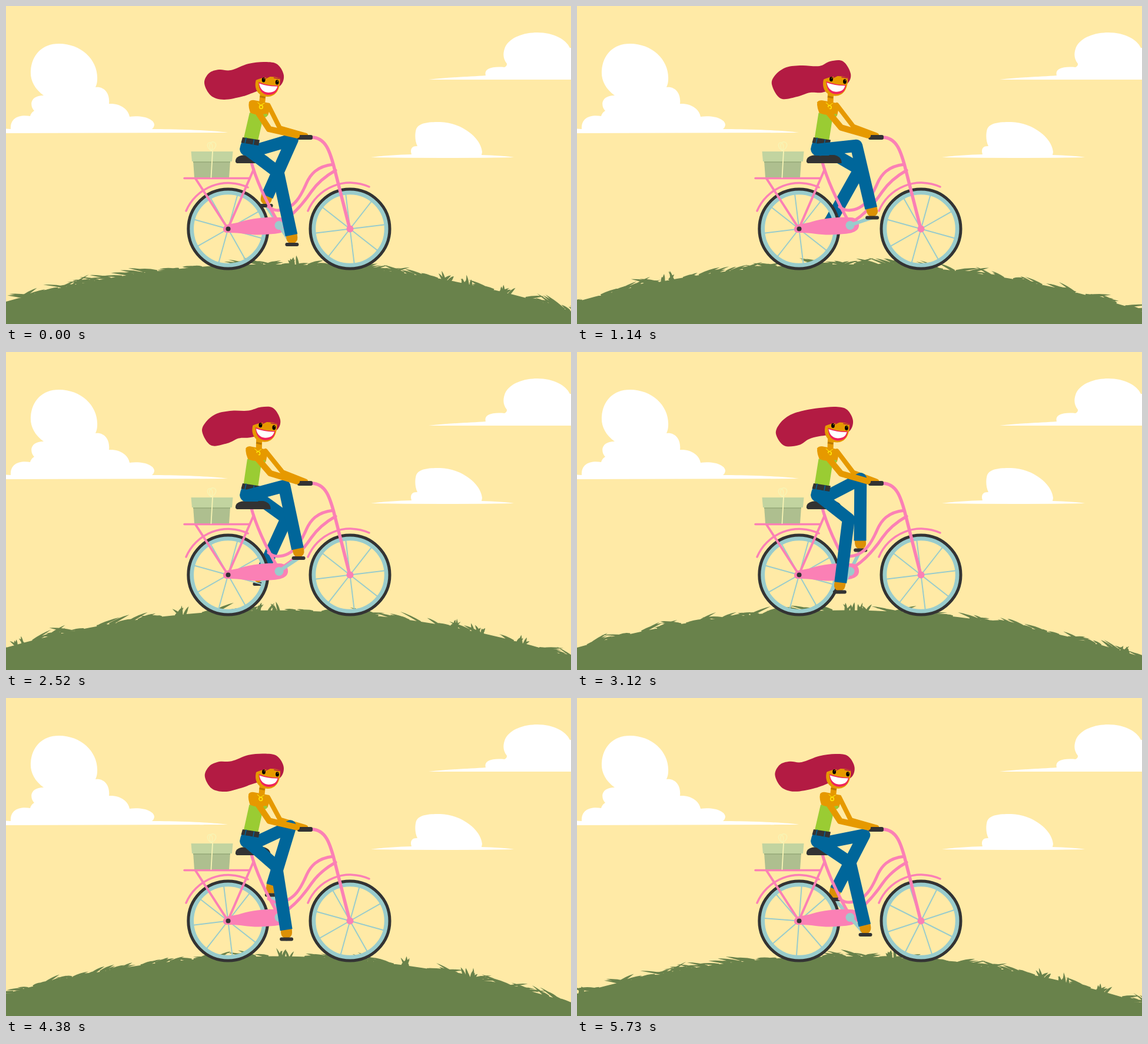
These frames come from a looping animation (960x540 px, 5760 ms). An HTML page:

```html
<!DOCTYPE html>
<html lang="en">
<head>
<meta charset="utf-8">
<title>Bicycle ride</title>
<style>
  html, body { margin: 0; width: 100%; height: 100%; overflow: hidden; background: #ffeaa6; }
  svg { display: block; width: 100%; height: 100%; }
  .line { fill: none; stroke-linecap: round; stroke-linejoin: round; }
  .pink { stroke: #fb80b5; }
  .steel { stroke: #99cccc; }
  .skin { stroke: #e69900; }
  .denim { stroke: #00669a; stroke-linecap: butt; }
</style>
</head>
<body>
<svg viewBox="0 0 960 540">
  <rect width="960" height="540" fill="#ffeaa6"/>
  <g fill="#fff">
    <path d="M-5 208L8 209C7 190 22 184 41 187C43 180 48 178 48 178C40 170 40 152 64 152C48 140 41 126 42 110C44 82 62 64 90 64C128 64 157 92 155 125C155 131 153 136 152 138C168 136 177 150 175 166C195 165 208 176 210 188C235 185 252 193 252 202Q251 207 248 209C290 209 350 211 377 215L-5 216Z"/>
    <path d="M718 125C750 121 790 120 815 118C812 108 822 102 847 104C851 102 851 100 851 98C843 88 845 78 848 70C856 53 880 45 903 45C930 45 952 57 958 71L965 72V125Z"/>
    <path d="M620 257Q650 253 689 252C686 243 690 237 699 238C694 228 695 215 697 209C701 199 716 196.500 738 197C773 198 807 223 809 248L808 253Q845 254 863 257Q740 259 620 257Z"/>
  </g>
  <path id="hill" fill="#69824b"/>

  <path id="farArm" class="line skin" stroke-width="8"/>
  <g id="farLeg"></g>

  <g id="rearWheel"></g>
  <g id="frontWheel"></g>
  <g class="line pink">
    <path stroke-width="3.500" d="M303 292.500H414"/>
    <path stroke-width="4" d="M322 293L377 378L421 277"/>
    <path stroke-width="3.500" d="M306 348A78 78 0 0 1 411 308M513 348A78 78 0 0 1 617 307"/>
    <path stroke-width="5" d="M416 262Q428 308 464 370M556 269C528 272 517 286 510 302C503 318 491 346 462 347C455 347 450 344 446 341M560 279C541 290 528 302 519 315C508 331 490 353 472 364"/>
    <path stroke-width="5.500" d="M519 223C544 223 551 250 557 272L584 378"/>
  </g>
  <path fill="#fb80b5" d="M369 379C369 368 388 371 400 366C420 360 445 358 462 359C475 358 480 366 479 374C477 386 460 387 440 388C415 390 395 384 378 385C371 385 369 383 369 379Z"/>
  <circle cx="377.500" cy="378.500" r="4" fill="#333"/>
  <circle cx="584.500" cy="378.500" r="6" fill="#fb80b5"/>

  <path fill="#aebf8f" d="M318 263H381L379 291H320Z"/>
  <path fill="#9db07f" d="M318 263H381V266H318Z"/>
  <path fill="#c2d4a0" d="M314.500 247H385.500L384 264H316Z"/>
  <g class="line" stroke="#f8f4b4" stroke-width="1.800">
    <path d="M351 247L348.500 291"/>
    <path stroke-width="1.500" d="M349 246C340 240 341 231 347 232C352 234 351 241 349 246C343 236 347 230 353 231C360 234 356 242 349 246"/>
  </g>

  <path fill="#333" d="M390 265C389 257 396 253 408 253H437C446 255 450 260 449.500 267H392Z"/>
  <rect x="495" y="219" width="26" height="8" rx="3" fill="#333"/>
  <circle cx="464" cy="372.500" r="7.500" fill="#99cccc"/>

  <path fill="#00669a" d="M401 230L431 235L437 244L428 254H406Q398 252 397 243Q398 236 401 230Z"/>
  <g id="torso">
    <path class="line skin" stroke-width="10" d="M437 148L435 166"/>
    <path fill="#b97800" d="M432 152L441 154L440 157L431 155Z"/>
    <path fill="#e69900" d="M413 163Q416 159 422 160L448 165Q451 168 445 186H417Q411 172 413 163Z"/>
    <path fill="#9acc33" d="M414 181Q426 186 435 184L444 183Q447 188 437 190L428 229L404 224Z"/>
    <circle cx="433.500" cy="171.500" r="2.900" fill="none" stroke="#ffe60a" stroke-width="1.600"/>
    <path class="line" stroke="#ffe60a" stroke-width="1" d="M428 164L433 168.500L439 165"/>
  </g>
  <path fill="#333" d="M402 223L431 227.500L429 237L399.500 232Z"/>
  <path class="line" stroke="#00669a" stroke-width="1.500" d="M408 224L406 233M421.500 227L420 235"/>
  <g id="nearLeg"></g>
  <path id="nearArm" class="line skin" stroke-width="10.500"/>

  <path id="hair" fill="#b31b43"/>
  <g id="face">
    <path fill="#e69900" d="M425 126Q432 121 442 120.500Q456 119 466 123C467 142 458 154 445 154C430 154 421 142 425 126Z"/>
    <path fill="#b31b43" d="M424 126Q431 119 450 119.500L439 125L443 121Q434 122 424 126Z"/>
    <path class="line" stroke="#b31b43" stroke-width="1.500" d="M456 122L465 123.500"/>
    <ellipse cx="438" cy="125.500" rx="2.900" ry="4"/>
    <ellipse cx="461" cy="129.500" rx="2.900" ry="4"/>
    <circle cx="438.800" cy="123.700" r=".8" fill="#e69900"/>
    <circle cx="461.800" cy="127.700" r=".8" fill="#e69900"/>
    <path fill="#f0245a" d="M429.500 129Q446 136 463 135Q462 151 446 151Q430 150 429.500 129Z"/>
    <path fill="#fff" d="M430.500 131.500Q446 137 461.500 136.500Q459 147 446 147Q433 146 430.500 131.500Z"/>
  </g>
</svg>
<script>
const LOOP = 5760, STEP = 30, TURN = Math.PI * 2;
const $ = id => document.getElementById(id);
const setD = (id, d) => $(id).setAttribute('d', d);
const mod = (a, n) => ((a % n) + n) % n;
const at = (x, y) => x.toFixed(1) + ' ' + y.toFixed(1);

let seed = 29;
const rand = (lo = 0, hi = 1) => {
  seed = (seed * 16807) % 2147483647;
  return lo + (hi - lo) * seed / 2147483647;
};

// Ground: a large disc whose rim carries clusters of blades
const HILL = { x: 453, top: 438.5, r: 1650 };
const RIM = HILL.r * TURN * 300 / 360;
const blades = [];
for (let s = 0; s < RIM - 40; s += rand(16, 48)) {
  const tuft = rand() < 0.1, side = rand() < 0.5 ? -1 : 1;
  const count = Math.round(tuft ? rand(5, 7) : rand(2, 5));
  for (let i = 0; i < count; i++) {
    blades.push({
      s: s + rand(0, tuft ? 20 : 34),
      lean: tuft ? rand(-0.8, 0.8) : side * rand(1.15, 1.48),
      len: tuft ? rand(9, 18) : rand(16, 40),
      w: rand(1.6, 2.8)
    });
  }
}

function drawHill(t) {
  const edge = x => HILL.top + HILL.r - Math.sqrt(HILL.r ** 2 - (x - HILL.x) ** 2);
  let d = `M-20 560L-20 ${edge(-20)}A${HILL.r} ${HILL.r} 0 0 1 980 ${edge(980)}L980 560Z`;
  const shift = RIM * t / LOOP;
  for (const b of blades) {
    const s = mod(b.s - shift, RIM) - 60;
    if (s > 1020) continue;
    const a = (s - HILL.x) / HILL.r, lean = a + b.lean;
    const x = HILL.x + HILL.r * Math.sin(a);
    const y = HILL.top + HILL.r * (1 - Math.cos(a)) + 1;
    const ux = Math.sin(lean), uy = -Math.cos(lean), nx = -uy * b.w, ny = ux * b.w;
    const mx = x + ux * b.len * 0.5, my = y + uy * b.len * 0.5 - 1;
    const tip = at(x + ux * b.len, y + uy * b.len + 1);
    // both sides keep the same winding as the hill
    d += `M${at(x - nx, y - ny)}Q${at(mx - nx, my - ny)} ${tip}Q${at(mx + nx, my + ny)} ${at(x + nx, y + ny)}Z`;
  }
  setD('hill', d);
}

function buildWheel(id, x) {
  let spokes = '';
  for (let i = 0; i < 8; i++) {
    const a = i * TURN / 8;
    spokes += `M0 0L${at(60 * Math.cos(a), 60 * Math.sin(a))}`;
  }
  $(id).innerHTML = `<g transform="translate(${x} 378.5)" fill="none">
    <path class="steel" stroke-width="2" d="${spokes}"/>
    <circle r="62" class="steel" stroke-width="7.500"/>
    <circle r="67.500" stroke="#333" stroke-width="5"/></g>`;
}
const spin = (id, deg) => $(id).querySelector('path').setAttribute('transform', `rotate(${deg})`);

const CRANK = { x: 464, y: 372, r: 39.7 };
const THIGH = 64;
const NEAR = { id: 'nearLeg', x: 411, y: 244, shin: 109, crankOnTop: false };
const FAR = { id: 'farLeg', x: 425, y: 245, shin: 105, crankOnTop: true };

function drawLeg(leg, angle) {
  const px = CRANK.x + CRANK.r * Math.cos(angle), py = CRANK.y + CRANK.r * Math.sin(angle);
  const ax = px + (470 - px) * 0.06, ay = py - 16;
  const dx = ax - leg.x, dy = ay - leg.y, dist = Math.hypot(dx, dy);
  const bend = Math.acos((THIGH ** 2 + dist ** 2 - leg.shin ** 2) / (2 * THIGH * dist));
  const a = Math.atan2(dy, dx) - bend;
  const knee = at(leg.x + THIGH * Math.cos(a), leg.y + THIGH * Math.sin(a));
  const crank = `<path class="line steel" stroke-width="6" d="M${CRANK.x} ${CRANK.y}L${at(px, py)}"/>`;
  const limb = `
    <path class="line" stroke="#db9006" stroke-width="19" d="M${at(ax, ay - 3)}L${at(px, py - 11)}"/>
    <circle cx="${leg.x}" cy="${leg.y}" r="10" fill="#00669a"/>
    <path class="line denim" stroke-width="21" d="M${at(leg.x, leg.y)}L${knee}L${at(ax, ay)}"/>`;
  const sole = `<path class="line" stroke="#333" stroke-width="6" d="M${at(px - 8.5, py)}h17"/>`;
  $(leg.id).innerHTML = (leg.crankOnTop ? limb + crank : crank + limb) + sole;
}

// Hair outlines through one sway, as x,y pairs
const HAIR_TIMES = [0, 0.333, 0.583, 0.708];
const HAIR = [
  [337,131, 345,114, 362,108, 382,109, 412,98, 440,95, 461,99, 472,118, 465,136, 440,140, 418,148, 400,154, 370,159, 348,152],
  [338,139, 345,121, 362,107, 387,99, 412,95, 440,93, 459,98, 469,117, 462,135, 438,140, 412,143, 394,148, 377,158, 352,159],
  [331,133, 338,116, 356,104, 382,101, 412,102, 430,94, 452,94, 465,115, 459,132, 436,140, 416,147, 396,147, 374,154, 346,157],
  [331,131, 338,113, 356,105, 382,103, 411,103, 428,95, 454,95, 466,116, 460,133, 437,141, 418,150, 395,152, 366,156, 343,150]
];
const hairTime = k => HAIR_TIMES[mod(k, 4)] + Math.floor(k / 4);

function hairAt(p) {
  let k = 3;
  while (HAIR_TIMES[k] > p) k--;
  const t0 = hairTime(k), t1 = hairTime(k + 1), span = t1 - t0, u = (p - t0) / span;
  return HAIR[k].map((v, i) => {
    const value = j => HAIR[mod(j, 4)][i];
    const slope = j => (value(j + 1) - value(j - 1)) / (hairTime(j + 1) - hairTime(j - 1)) * span;
    const w = value(k + 1), m0 = slope(k), m1 = slope(k + 1);
    return v + u * m0 + u * u * (3 * (w - v) - 2 * m0 - m1) + u ** 3 * (2 * (v - w) + m0 + m1);
  });
}

function closedCurve(flat) {
  const n = flat.length / 2;
  const pt = i => [flat[mod(i, n) * 2], flat[mod(i, n) * 2 + 1]];
  let d = 'M' + at(...pt(0));
  for (let i = 0; i < n; i++) {
    const [a, b, c, e] = [pt(i - 1), pt(i), pt(i + 1), pt(i + 2)];
    d += `C${at(b[0] + (c[0] - a[0]) / 6, b[1] + (c[1] - a[1]) / 6)} ` +
      `${at(c[0] - (e[0] - b[0]) / 6, c[1] - (e[1] - b[1]) / 6)} ${at(...c)}`;
  }
  return d + 'Z';
}

function drawBody(p) {
  const sway = Math.cos(TURN * (p + 0.04)) - 1;
  const nod = Math.cos(TURN * (p - 0.08)) - 1;
  const dx = 2.6 * sway, k = -dx / 60;
  $('torso').setAttribute('transform', `matrix(1 0 ${k} 1 ${-k * 228} ${-0.08 * dx})`);
  $('face').setAttribute('transform', `translate(${3 * nod} ${0.6 * nod})`);
  setD('nearArm', `M${at(419.5 + dx, 167 + 0.6 * sway)}L${at(447 - sway, 209 + 1.5 * sway)}L494 219.5`);
  setD('farArm', `M${at(446 + dx, 169 + 0.5 * sway)}L${at(465 - 2.5 * sway, 207 + 1.5 * sway)}L509 219.5`);
  setD('hair', closedCurve(hairAt(p)));
}

function render(t) {
  drawHill(t);
  const wheel = t * 0.375;
  spin('rearWheel', wheel + 15.5);
  spin('frontWheel', wheel - 7);
  const angle = (56.5 + t * 0.25) * Math.PI / 180;
  drawLeg(NEAR, angle);
  drawLeg(FAR, angle + Math.PI);
  drawBody(mod(t / 720, 1));
}

buildWheel('rearWheel', 377.3);
buildWheel('frontWheel', 584.5);
const start = performance.now();
function tick() {
  const t = (performance.now() - start) % LOOP;
  render(Math.floor(t / STEP) * STEP);
  requestAnimationFrame(tick);
}
tick();
</script>
</body>
</html>
```
